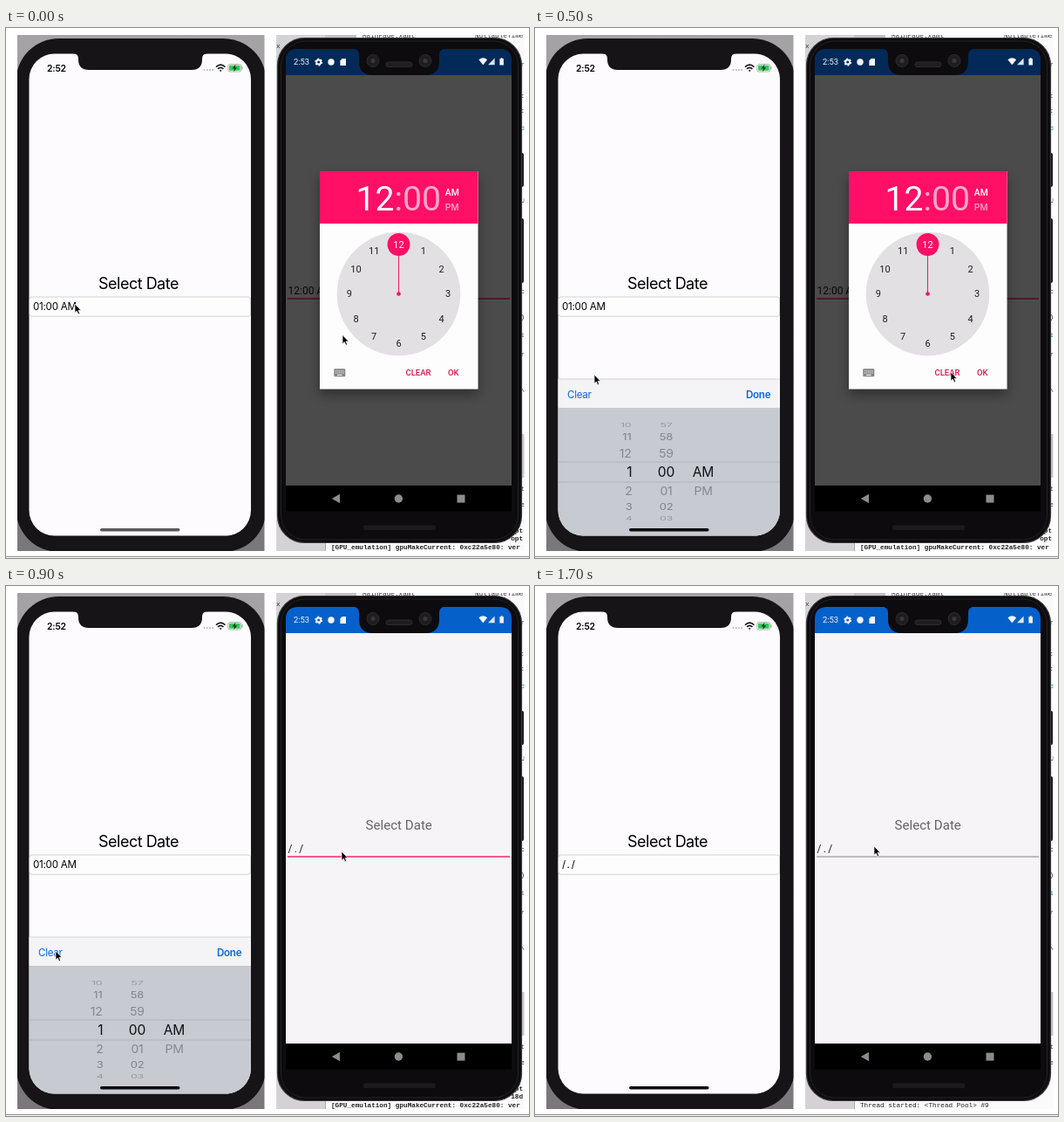
Write an HTML page that moves like this. It is 600 by 607 pixels and loops after 1.8 s.

```html
<!DOCTYPE html>
<html lang="en">
<head>
<meta charset="utf-8">
<style>
  html, body { margin: 0; width: 100%; height: 100%; overflow: hidden; background: #fff; }
  svg { display: block; width: 100vw; height: 100vh; }
  .ios { font-family: Inter, sans-serif; }
  .droid { font-family: Roboto, sans-serif; }
  .mono { font-family: "Liberation Mono", monospace; font-size: 7.7px; }
  .mid { text-anchor: middle; }
  .end { text-anchor: end; }
</style>
</head>
<body>
<svg viewBox="0 0 600 607" xmlns="http://www.w3.org/2000/svg">
  <defs>
    <clipPath id="leftClip"><rect x="13" y="8" width="283.5" height="591"/></clipPath>
    <clipPath id="rightClip"><rect x="310" y="8" width="284.5" height="591"/></clipPath>
    <clipPath id="iosScreen"><rect x="26.5" y="29.5" width="254.5" height="552" rx="29"/></clipPath>
    <linearGradient id="desk" x2="0" y2="1">
      <stop offset="0" stop-color="#a5a3a5"/><stop offset="1" stop-color="#79777a"/>
    </linearGradient>
    <filter id="shadow" x="-20%" y="-20%" width="140%" height="140%">
      <feDropShadow dx="0" dy="6" stdDeviation="7" flood-opacity=".4"/>
    </filter>
    <path id="arrow" d="M0 0V10.2L2.3 8.1L3.9 11.7L5.6 10.9L4 7.4H7.1Z" fill="#000" stroke="#fff" stroke-width=".7"/>
  </defs>
  <rect width="600" height="607" fill="#fff"/>
  <path d="M0 605.5H600" stroke="#8c8c8c"/>

  <g clip-path="url(#leftClip)" class="ios">
    <rect x="13" y="8" width="284" height="592" fill="url(#desk)"/>
    <rect x="11.5" y="12" width="287" height="588" rx="49" fill="#161417"/>
    <g clip-path="url(#iosScreen)">
      <rect x="26" y="29" width="256" height="553" fill="#fdfbfe"/>
      <text x="106" y="298.8" font-size="18" letter-spacing="-.5">Select Date</text>
      <rect x="26.8" y="308" width="254" height="22.3" rx="3" fill="#fefdfe" stroke="#cfcdd0" stroke-width=".9"/>
      <text id="iosValue" x="31" y="323.3" font-size="11.6"></text>
      <g id="picker">
        <rect x="26" y="402" width="256" height="33" fill="#f4f3f6"/>
        <path d="M26 402H282" stroke="#c9c8cb" stroke-width=".8"/>
        <g font-size="11.6" letter-spacing="-.3" fill="#0b69d6">
          <text x="37" y="424.4">Clear</text>
          <text x="242" y="424.4" font-weight="600">Done</text>
        </g>
        <rect x="26" y="435" width="256" height="150" fill="#c7cad0"/>
        <path d="M26 497H282M26 520H282" stroke="#abaeb4" stroke-width=".8"/>
        <g id="wheels"></g>
      </g>
      <rect id="homeBar" x="108" y="573" width="91.5" height="3.6" rx="1.8"/>
    </g>
    <path d="M76 29H232Q225 29 225 35V36Q225 48 213 48H95Q83 48 83 36V35Q83 29 76 29Z" fill="#161417"/>
    <text x="47" y="49.6" font-size="10.4" font-weight="600" letter-spacing="-.2">2:52</text>
    <g fill="#b9b7ba">
      <circle cx="227.5" cy="48" r="1"/><circle cx="230.8" cy="48" r="1"/>
      <circle cx="234" cy="48" r="1"/><circle cx="237.2" cy="48" r="1"/>
    </g>
    <g fill="none" stroke="#111" stroke-width="1.6">
      <path d="M241 44.6Q246.2 39.8 251.4 44.6M243 46.8Q246.2 44 249.4 46.8"/>
      <path d="M246.2 50.2L244.9 48.6Q246.2 47.6 247.5 48.6Z" fill="#111" stroke="none"/>
    </g>
    <rect x="254.8" y="41.6" width="15" height="8.4" rx="2.2" fill="#fff" stroke="#8fa494" stroke-width=".8"/>
    <rect x="256" y="42.8" width="12.6" height="6" rx="1.2" fill="#35c759"/>
    <path d="M270.8 44.3V47.4" stroke="#8fa494" stroke-width="1.2"/>
    <path d="M263.4 41.5L259.6 46.4H262L261.2 50.2L265.2 45.2H262.8Z" fill="#143a1e"/>
    <use id="leftArrow" href="#arrow"/>
  </g>

  <g clip-path="url(#rightClip)">
    <rect x="310" y="8" width="285" height="592" fill="#fbfafb"/>
    <rect x="310" y="8" width="56" height="592" fill="#d4d2d5"/>
    <rect x="366" y="8" width="36" height="6" fill="#c2c0c3"/>
    <path d="M366.5 585V599" stroke="#a9a7aa"/>
    <g class="mono" fill="#333">
      <text x="409" y="11">MainPage.xaml</text>
      <text x="538" y="11">NullableTime</text>
      <text x="310" y="23">x</text>
      <g id="strip"></g>
    </g>
    <rect x="588" y="465" width="7" height="50" fill="#c9c7ca"/>
    <g class="mono" fill="#222" font-weight="bold">
      <g id="oldLog">
        <text x="593" y="578" class="end">opt</text>
        <text id="logTail" x="593" y="587" class="end"></text>
      </g>
      <text id="logLine" x="373" y="596.6"></text>
    </g>
    <rect x="588" y="143" width="6" height="39" rx="2" fill="#1c1b1e"/>
    <rect x="588" y="218" width="6" height="74" rx="2" fill="#1c1b1e"/>
    <rect x="311.5" y="11.5" width="280" height="578" rx="31" fill="#0d0c0e" stroke="#3b393d" stroke-width="1.2"/>
    <rect x="315.5" y="15" width="272" height="571" rx="28" fill="#0d0b0d" stroke="#232125" stroke-width="1"/>

    <g class="droid">
      <path d="M321 54V38Q321 24 335 24H566Q580 24 580 38V54Z" fill="#0560c9"/>
      <path id="barScrim" d="M321 54V38Q321 24 335 24H566Q580 24 580 38V54Z"/>
      <rect x="321" y="54" width="259" height="470" fill="#f7f4f7"/>
      <text x="450.7" y="278.8" font-size="15.1" class="mid" fill="#656365">Select Date</text>
      <text id="droidValue" x="323.5" y="305" font-size="12" fill="#1b1a1b"></text>
      <path id="underline" d="M323 310H578"/>
      <rect id="scrim" x="321" y="54" width="259" height="470"/>
      <path d="M398 23.5Q405 24 405 31V38Q405 54 421 54H481Q497 54 497 38V31Q497 24 504 23.5Z" fill="#0d0b0d"/>
      <g fill="#1f1d21" stroke="#2e2b30">
        <circle cx="421" cy="37.5" r="7"/><circle cx="481" cy="37.5" r="7"/>
        <rect x="436" y="39" width="30" height="5.5" rx="2.7"/>
      </g>
      <g fill="#3a373d"><circle cx="421" cy="37.5" r="2.5"/><circle cx="481" cy="37.5" r="2.5"/></g>
      <g fill="#f4f6fb">
        <text x="330" y="42" font-size="9.4">2:53</text>
        <circle cx="358.7" cy="39" r="2.5" fill="none" stroke="#f4f6fb" stroke-width="2"/>
        <circle cx="358.7" cy="39" r="3.8" fill="none" stroke="#f4f6fb" stroke-width="1.3" stroke-dasharray="2 1.98"/>
        <circle cx="373" cy="39" r="3.7"/>
        <path d="M385.6 35H390V43H383.4V37.4Z"/>
        <path d="M542.4 36.3Q547.3 32.4 552.2 36.3L547.3 42.3Z"/>
        <path d="M560.6 34.4V42.3H553Z" opacity=".9"/>
        <path d="M566.4 35.3H567.7V34.2H569.6V35.3H570.9V42.4H566.4Z"/>
      </g>
      <rect x="321" y="524" width="259" height="29.5" fill="#000"/>
      <g fill="#8d8b8e">
        <path d="M373.8 539L383 533.8V544.2Z"/>
        <circle cx="450.4" cy="539" r="4.7"/>
        <rect x="517.5" y="534.6" width="9" height="9"/>
      </g>
      <rect x="410" y="569.5" width="83" height="5.6" rx="2" fill="#1d1a1d"/>

      <g id="dialog">
        <rect x="360" y="164" width="181.5" height="249.5" fill="#fefdfe" filter="url(#shadow)"/>
        <rect x="360" y="164" width="181.5" height="60" fill="#ff0f66"/>
        <text x="499" y="209" font-size="39.2" class="end" fill="#ffa8c8"><tspan fill="#fff">12</tspan>:00</text>
        <g font-size="10.4" font-weight="500">
          <text x="503.8" y="192.4" fill="#fff">AM</text>
          <text x="503.8" y="209.2" fill="#ffa3c4">PM</text>
        </g>
        <circle cx="450.5" cy="304.5" r="70.8" fill="#e3e0e4"/>
        <path d="M450.5 304.5V250" stroke="#e8236d" stroke-width="1.1"/>
        <circle cx="450.5" cy="304.5" r="2.3" fill="#e8156a"/>
        <circle cx="450.5" cy="248" r="13" fill="#ff0f66"/>
        <g id="hours" class="mid" font-size="11"></g>
        <rect x="376.3" y="390.2" width="13" height="9" rx="1" fill="#858387"/>
        <path d="M378 392.8H388M378 395H388" stroke="#fff" stroke-width="1" stroke-dasharray="1.2 .9"/>
        <path d="M380 397.4H385.6" stroke="#fff" stroke-width="1"/>
        <g font-size="9.5" font-weight="500" fill="#d2144f">
          <text x="458.5" y="398">CLEAR</text>
          <text x="507" y="398">OK</text>
        </g>
      </g>
    </g>
    <use id="rightArrow" href="#arrow"/>
  </g>
</svg>
<script>
const STEP = 100, STEPS = 18;
const $ = id => document.getElementById(id);

function addText(parent, str, attrs) {
  const el = document.createElementNS("http://www.w3.org/2000/svg", "text");
  el.textContent = str;
  for (const k in attrs) el.setAttribute(k, attrs[k]);
  parent.append(el);
}

function set(id, attrs) {
  for (const k in attrs) $(id).setAttribute(k, attrs[k]);
}

function setText(id, str) {
  if ($(id).textContent !== str) $(id).textContent = str;
}

// Picker wheels: rows get smaller, flatter and paler away from the middle.
const ROW_Y = [0, 21.5, 40, 53.5];
const ROW_SIZE = [15.6, 14, 13, 12.4];
const ROW_FLAT = [1, .95, .82, .5];
const ROW_FILL = ["#111214", "#85888e", "#7f8288", "#95989e"];

function addRow(str, x, i, anchor) {
  const d = Math.abs(i), y = 508.5 + Math.sign(i) * ROW_Y[d];
  addText($("wheels"), str, {
    transform: `translate(${x} ${y}) scale(1 ${ROW_FLAT[d]})`,
    y: ROW_SIZE[d] * .36, "font-size": ROW_SIZE[d], fill: ROW_FILL[d],
    "text-anchor": anchor, "letter-spacing": -.2
  });
}

for (let i = -3; i <= 3; i++) {
  addRow(String((i + 12) % 12 + 1), 111.5 - (i < 0 ? 1 : 0), i, "end");
  addRow(String((i + 60) % 60).padStart(2, "0"), 150.5, i, "middle");
}
addRow("AM", 193, 0, "middle");
addRow("PM", 193, 1, "middle");

for (let h = 1; h <= 12; h++) {
  const a = h * Math.PI / 6;
  addText($("hours"), h, {
    x: 450.5 + 56.6 * Math.sin(a), y: 308.4 - 56.6 * Math.cos(a),
    fill: h === 12 ? "#fff" : "#1e1c1f"
  });
}

// Sliver of an editor visible beside the phone.
const slivers = [[44, "r"], [80, ":"], [97, ":"], [117, "d"], [200, "U"], [304, "c"],
  [333, ")"], [354, "i"], [376, "r"], [417, "\\"], [530, "t"], [548, "e"]];
for (const [y, s] of slivers)
  addText($("strip"), s, { x: 590.5, y, fill: /[di]/.test(s) ? "#2a6fd0" : "#333" });

const leftPath = [[0, 79, 316], [1, 79, 316], [3, 78, 381], [7, 58, 413], [8, 57, 418], [17, 57, 418]];
const rightPath = [[0, 386, 351.5], [3, 478, 391], [7, 476, 397], [8, 450, 369],
  [9, 385, 304], [13, 387, 298], [17, 389, 298]];

function along(path, s) {
  const i = Math.max(1, path.findIndex(p => p[0] >= s));
  const [s0, x0, y0] = path[i - 1], [s1, x1, y1] = path[i];
  const k = (s - s0) / (s1 - s0);
  return `translate(${x0 + (x1 - x0) * k} ${y0 + (y1 - y0) * k})`;
}

// Share of a four-step slide still to go.
function remaining(s, start) {
  const p = Math.min(1, Math.max(0, (s - start) / 4));
  return (1 - p) ** 2.5;
}

function draw(t) {
  const s = Math.floor(t / STEP) % STEPS;

  const hidden = s < 9 ? remaining(s, 1) : 1 - remaining(s, 9);
  set("picker", { transform: `translate(0 ${182 * hidden})` });
  set("homeBar", { fill: s === 0 ? "#5b595c" : "#080709" });
  setText("iosValue", s < 10 ? "01:00 AM" : "/./");
  set("iosValue", { "letter-spacing": s < 10 ? -.25 : 1.8 });
  set("leftArrow", { transform: along(leftPath, s), visibility: s < 13 ? "visible" : "hidden" });

  const open = s < 8;
  set("dialog", { visibility: open ? "visible" : "hidden" });
  set("scrim", { opacity: open ? .69 : s === 8 ? .21 : 0 });
  set("barScrim", { opacity: open ? .56 : s === 8 ? .17 : 0 });
  setText("droidValue", open ? "12:00 AM" : "/./");
  set("droidValue", { "letter-spacing": open ? 0 : 2.3 });
  const focused = s < 11;
  set("underline", { stroke: focused ? "#f0266f" : "#858386", "stroke-width": focused ? 1.4 : 1 });
  set("rightArrow", { transform: along(rightPath, s) });

  set("oldLog", { visibility: focused ? "visible" : "hidden" });
  setText("logTail", open ? "opt" : "18d");
  setText("logLine", focused ? "[GPU_emulation] gpuMakeCurrent: 0xc22a5e80: ver" : "Thread started: <Thread Pool> #9");
  set("logLine", { "font-weight": focused ? "bold" : "normal" });
}

function tick() {
  draw(performance.now());
  requestAnimationFrame(tick);
}
tick();
</script>
</body>
</html>
```
